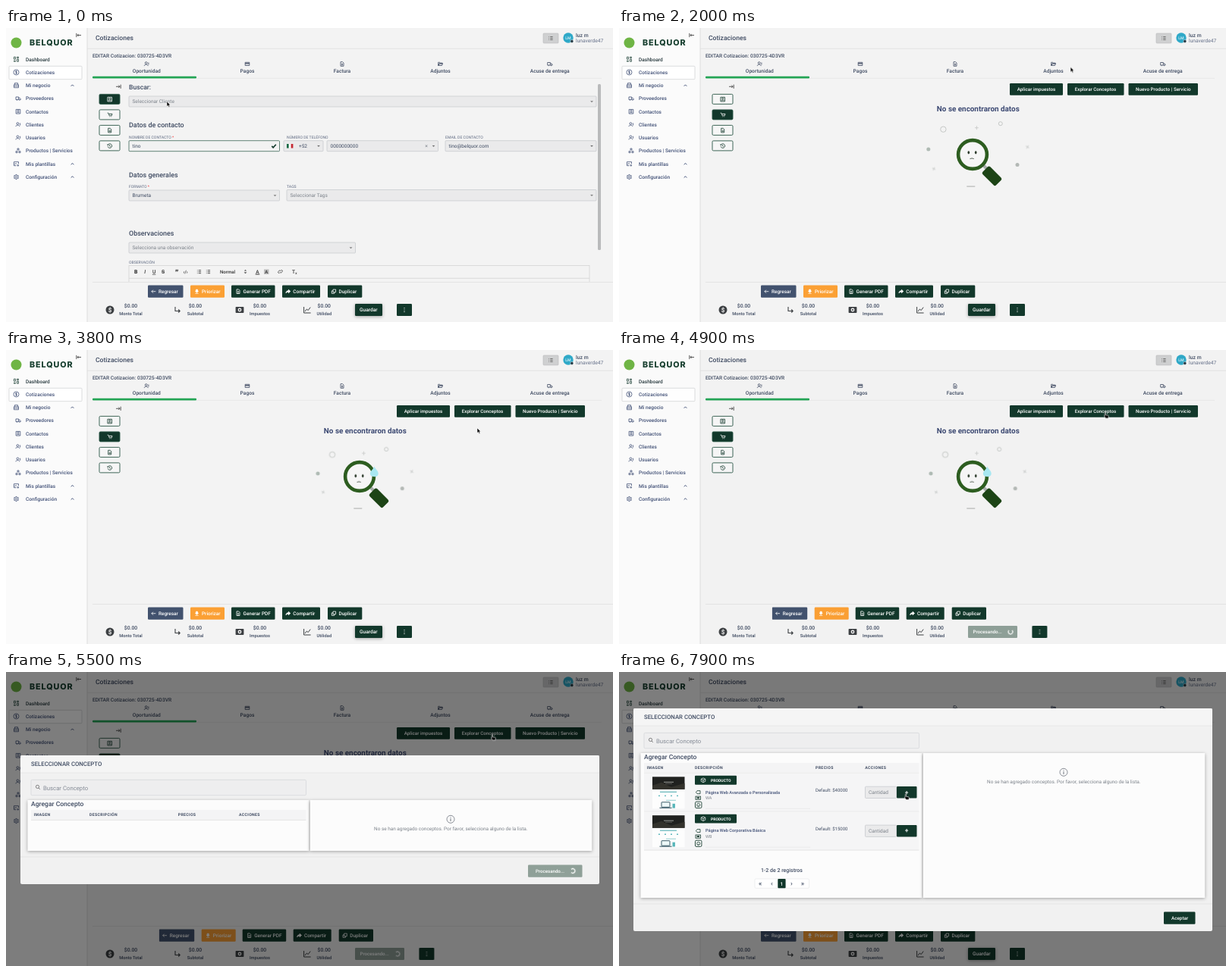
Write an HTML page that moves like this. It is 800 px wide and 388 px high and loops after 8 s.

```html
<!DOCTYPE html>
<html lang="es">
<head>
<meta charset="utf-8">
<title>Cotizaciones</title>
<style>
html, body { margin: 0; width: 100%; height: 100%; overflow: hidden; background: #f3f3f3; }
svg { display: block; }
text { font-family: Roboto, sans-serif; text-rendering: geometricPrecision; white-space: pre; }
.logo { font-family: Inter, sans-serif; letter-spacing: .9px; }
.caps { letter-spacing: .35px; }
.shade { filter: drop-shadow(0 1px 2px #0005); }
.form, .empty, .idle, .busy, .full, .thumbs, .arrow, .hand, .row, .menu { animation: 8s step-end infinite; }
.form { animation-name: form; }
.empty { animation-name: empty; }
.idle { animation-name: idle; }
.busy { animation-name: busy; }
.row { animation-name: row; }
.menu { animation-name: menu; }
.full { animation-name: full; }
.thumbs { animation-name: thumbs; }
.arrow { animation-name: arrow; }
.hand { animation-name: hand; }
.backdrop { animation: backdrop 8s linear infinite; }
.loading { animation: loading 8s linear infinite; }
.cursor { animation: cursor 8s ease-in-out infinite; }
.drift { animation: drift 8s ease-in-out infinite; }
.drop { animation: drop 8s ease-in-out infinite; }
.spin { animation: spin .8s linear infinite; }
@keyframes form { 0% { opacity: 1 } 13.75%, 100% { opacity: 0 } }
@keyframes empty { 0% { opacity: 0 } 13.75%, 100% { opacity: 1 } }
@keyframes idle { 0% { opacity: 1 } 60% { opacity: 0 } 72.5%, 100% { opacity: 1 } }
@keyframes busy { 0% { opacity: 0 } 60% { opacity: 1 } 72.5%, 100% { opacity: 0 } }
@keyframes row { 0% { transform: none } 60% { transform: translateX(14.7px) } 72.5%, 100% { transform: none } }
@keyframes menu { 0% { transform: none } 60% { transform: translateX(29.4px) } 72.5%, 100% { transform: none } }
@keyframes full { 0% { opacity: 0 } 72.5%, 100% { opacity: 1 } }
@keyframes thumbs { 0% { opacity: 0 } 81.25%, 100% { opacity: 1 } }
@keyframes arrow { 0% { opacity: 1 } 9% { opacity: 0 } 15.5% { opacity: 1 } 53.5% { opacity: 0 } 71% { opacity: 1 } 88% { opacity: 0 } 100% { opacity: 0 } }
@keyframes hand { 0% { opacity: 0 } 9% { opacity: 1 } 15.5% { opacity: 0 } 53.5% { opacity: 1 } 71% { opacity: 0 } 88%, 100% { opacity: 1 } }
@keyframes backdrop { 0%, 61.25% { opacity: 0 } 63.5%, 100% { opacity: .5 } }
@keyframes loading {
  0%, 65.6% { opacity: 0; transform: translateY(-20px) }
  68.5%, 72.49% { opacity: 1; transform: none }
  72.5%, 100% { opacity: 0; transform: none }
}
@keyframes cursor {
  0%, 2.5% { transform: translate(212px, 97px) }
  10%, 14.5% { transform: translate(137px, 113px) }
  25% { transform: translate(595px, 51.5px) }
  33% { transform: translate(632px, 78px) }
  45%, 48% { transform: translate(621px, 103px) }
  55%, 70% { transform: translate(640px, 82.5px) }
  77.5% { transform: translate(522px, 77.5px) }
  89%, 100% { transform: translate(377px, 161px) }
}
@keyframes drift { 0%, 25% { transform: none } 47%, 100% { transform: translate(var(--x), var(--y)) } }
@keyframes drop { 0%, 34% { opacity: 0; transform: translateY(-7px) } 46%, 100% { opacity: 1; transform: none } }
@keyframes spin { to { transform: rotate(360deg) } }
</style>
</head>
<body>
<svg id="stage" width="800" height="388" viewBox="0 0 800 388"></svg>
<script>
const NAVY = '#435278', SLATE = '#3f4b62', GREEN = '#12382b', GREY = '#7d838b', MUTED = '#8fa098';

const T = (x, y, s, size = 6.55, fill = NAVY, weight = 500, anchor = 'start', cls = '') =>
  `<text x="${x}" y="${y}" font-size="${size}" fill="${fill}" font-weight="${weight}" text-anchor="${anchor}" class="${cls}">${s}</text>`;
const M = (x, y, s, size, fill, weight) => T(x, y, s, size, fill, weight, 'middle');
const R = (x, y, w, h, fill, stroke = 'none', r = 0, extra = '') =>
  `<rect x="${x}" y="${y}" width="${w}" height="${h}" fill="${fill}" stroke="${stroke}" rx="${r}" ${extra}/>`;
const C = (x, y, r, fill, stroke = 'none', w = 1) =>
  `<circle cx="${x}" cy="${y}" r="${r}" fill="${fill}" stroke="${stroke}" stroke-width="${w}"/>`;
const L = (x1, y1, x2, y2, c = '#ddd', w = .7) =>
  `<path d="M${x1} ${y1}L${x2} ${y2}" stroke="${c}" stroke-width="${w}"/>`;
const G = (cls, ...parts) => `<g class="${cls}">${parts.join('')}</g>`;

// Icon paths, centred on the origin
const ICONS = {
  grid: 'M-3-3h2v3h-2zM1-3h2v1.5h-2zM-3 2h2v1h-2zM1 0h2v3h-2z',
  coin: 'M-3.5 0a3.5 3.5 0 1 0 7 0a3.5 3.5 0 1 0-7 0M1-1.3c-.8-.8-2-.5-2 .3c0 1.1 2 .8 2 1.9c0 .8-1.3 1-2 .3M0-2.3v4.6',
  bag: 'M-3-1h6v4h-6zM-2-1v-2h4v2M-3 1h6',
  truck: 'M-3-2h3.6v3.6h-3.6zM.6-.6h1.7l1 1.2v1h-2.7M-2 2.2h1M1.4 2.2h1',
  card: 'M-2.8-2.8h5.6v5.6h-5.6zM-1 -.8a1 1 0 1 0 2 0a1 1 0 1 0-2 0M-1.8 2c.4-1.4 3.2-1.4 3.6 0',
  user: 'M-2-1.4a1.4 1.4 0 1 0 2.8 0a1.4 1.4 0 1 0-2.8 0M-3 2.6c0-2.6 4.8-2.6 4.8 0M2.6-2v3',
  boxes: 'M-1-3h2v2h-2zM-3 .6h2v2h-2zM1 .6h2v2h-2z',
  image: 'M3 0v-2.6h-6v5h3M-2 1l1.4-1.8l1.2 1.2M1 2h2.6M2.3.8v2.6',
  gear: 'M-2.7 0a2.7 2.7 0 1 0 5.4 0a2.7 2.7 0 1 0-5.4 0M-1 0a1 1 0 1 0 2 0a1 1 0 1 0-2 0M0-3.6v.9M0 2.7v.9M-3.2-1.7l.8.4M2.4 1.3l.8.4M-3.2 1.7l.8-.4M2.4-1.3l.8-.4',
  pay: 'M-2.8-2.2h5.6v4.2h-5.6zM-2.8-.8h5.6M-2.8-.4h5.6',
  doc: 'M-2-2.8h2.6l1.4 1.4v4.2h-4zM-1 0h2M-1 1.4h2',
  folder: 'M-2.8 2v-4.2h2l.7.9h2.8v.8h-4zl1-2.5h4.8l-1 2.5z',
  cart: 'M-3-2.4h1.2l1.3 3.6h3l.8-2.4h-4.2M-.2 2.5h.4M2 2.5h.4',
  clock: 'M-2.3-1.5a2.8 2.8 0 1 1-.3 2.2M-2.8-2.3v1.4h1.4M0-1.5v1.6l1.2.8',
  chevron: 'M-1.8 1l1.8-1.8l1.8 1.8',
  caret: 'M-1.6-.6h3.2l-1.6 1.6z',
  back: 'M2.8 0h-5.4M-.6-2l-2 2l2 2',
  down: 'M-1-2.5h2v2h1l-2 2l-2-2h1zM-2 2.6h4',
  share: 'M-2.8 2c.2-2.4 1.6-3 3.4-3v-1.4l2.4 2.2l-2.4 2.2v-1.4c-1.4 0-2.6.3-3.4 1.4z',
  copy: 'M-1-2.6h3.6v3.6h-3.6zM-1-.8h-1.7v3.4h3.5v-1.6',
  corner: 'M-3-3.5v5.5h6M1.2 0l2 2l-2 2',
  chart: 'M-4.4-4v8h9M-3 2l2.4-3l1.8 1.6l3-4',
  list: 'M-2.6-2h.6M-.8-2h3.4M-2.6 0h.6M-.8 0h3.4M-2.6 2h.6M-.8 2h3.4',
  link: 'M-.4 1l-.8.8a1.2 1.2 0 0 1-1.6-1.6l1.4-1.4a1.2 1.2 0 0 1 1.6 0M.4-1l.8-.8a1.2 1.2 0 0 1 1.6 1.6l-1.4 1.4a1.2 1.2 0 0 1-1.6 0',
  search: 'M-2.6-.6a2.1 2.1 0 1 0 4.2 0a2.1 2.1 0 1 0-4.2 0M1 1l1.9 1.9',
  tag: 'M-2.6 0l1.6-2h4v4h-4z',
  box: 'M-2.8-1.4l2.8-1.4l2.8 1.4v3l-2.8 1.4l-2.8-1.4zl2.8 1.4l2.8-1.4M0 0v3',
  check: 'M-2.7.1l1.9 1.9l3.6-4',
  bar: 'M-3 0h5M.3-1.7l1.7 1.7l-1.7 1.7M3.2-2.6v5.2',
};
const I = (x, y, name, c = NAVY, fill = 'none', w = .8) =>
  `<path transform="translate(${x} ${y})" d="${ICONS[name]}" stroke="${c}" fill="${fill}" stroke-width="${w}" stroke-linejoin="round"/>`;

const button = (x, y, w, h, label, tx, size = 6.4, fill = GREEN) =>
  R(x, y, w, h, fill, 'none', 1.2) + T(tx, y + h / 2 + 2.3, label, size, '#fff');
const field = (x, y, w, h, label = '', fill = '#eaeaeb', stroke = '#c3c6ca', color = GREY) =>
  R(x, y, w, h, fill, stroke, 1, 'stroke-width=".7"') + T(x + 4.5, y + h / 2 + 2.3, label, 6.5, color, 400);
const select = (x, y, w, h, label, color) =>
  field(x, y, w, h, label, '#eaeaeb', '#c3c6ca', color) + I(x + w - 6, y + h / 2, 'caret', '#666', '#666', .2);
const spinner = (x, y) =>
  `<g transform="translate(${x} ${y})"><path class="spin" d="M0-2.9a2.9 2.9 0 1 1-2.9 2.9" fill="none" stroke="#fff" stroke-width="1.1"/></g>`;

function sidebar() {
  const items = [['Dashboard', 'grid'], ['Cotizaciones', 'coin'], ['Mi negocio', 'bag', 1], ['Proveedores', 'truck'],
    ['Contactos', 'card'], ['Clientes', 'user'], ['Usuarios', 'user'], ['Productos | Servicios', 'boxes'],
    ['Mis plantillas', 'image', 1], ['Configuración', 'gear', 1]];
  const rows = items.map(([label, icon, open], i) => {
    const y = 41.2 + i * 17.26, child = i > 2 && i < 8;
    return I(child ? 16 : 13.5, y, icon, i ? NAVY : '#24463b') + T(26, y + 2.3, label, 6.55, i ? NAVY : '#24363b')
      + (open ? I(87.5, y, 'chevron', NAVY, 'none', 1) : '');
  });
  return R(0, 0, 107, 388, '#fbfbfb') + L(107, 0, 107, 388, '#d5d5d5')
    + C(13.5, 19.5, 7, '#6fb545') + T(31, 23.4, 'BELQUOR', 10.8, '#173f2f', 800, 'start', 'logo')
    + `<g transform="translate(96 9.5) scale(-1 1)">${I(0, 0, 'bar', '#333')}</g>`
    + R(4, 50.3, 96, 17.4, '#fff', '#d3d5d6', 1, 'stroke-width=".8"') + rows.join('');
}

function header() {
  const tabs = [['Oportunidad', 185.3, 'user'], ['Pagos', 318, 'pay'], ['Factura', 443, 'doc'],
    ['Adjuntos', 572.5, 'folder'], ['Acuse de entrega', 716.7, 'truck']];
  return L(107, 27.3, 800, 27.3) + T(118, 16.2, 'Cotizaciones', 8.6, SLATE)
    + R(708, 7, 20, 13, '#cfd0d1', '#b9bbbd', 1, 'stroke-width=".6"') + I(718, 13.5, 'list', '#555')
    + C(741, 13, 6.7, '#2fa9c8') + M(741, 15, 'LM', 5.2, '#dff5fa') + C(745.8, 17.5, 2, '#1d3440', '#f3f3f3', .5)
    + T(751, 11.5, 'luz m', 6.8, SLATE) + T(751, 19.3, 'lunaverde47', 6.7, '#66718a', 400)
    + T(114, 39.2, 'EDITAR Cotizacion: 030725-4D3VR', 6.67, SLATE)
    + tabs.map(([s, x, icon]) => I(x, 47.5, icon, SLATE) + M(x, 58.9, s, 6.65, SLATE)).join('')
    + L(251, 66.3, 785, 66.3, '#e4e4e4') + R(114, 63.8, 137, 2.8, '#23a455', 'none', 1);
}

const sideTabs = active => ['card', 'cart', 'doc', 'clock'].map((icon, i) => {
  const y = 87.4 + i * 20.5, on = i === active;
  return R(123, y, 27, 13, on ? GREEN : '#f6f6f6', '#2a5646', 1.4, 'stroke-width=".9"') + I(136.7, y + 6.7, icon, on ? '#fff' : GREEN);
}).join('') + I(148, 77.3, 'bar', '#333');

function form() {
  const label = (x, y, s, req) => T(x, y, s + (req ? ' <tspan fill="#e33">*</tspan>' : ''), 5.1, '#5d6880', 400);
  const title = (y, s) => T(162, y, s, 8.95, SLATE);
  const tools = ['B', 'I', 'U', 'S'].map((s, i) => `<text x="${171.3 + i * 11.9}" y="323.9" font-size="6.8" font-weight="${i ? 500 : 800}" text-anchor="middle" fill="#333" ${['', 'font-style="italic"', 'text-decoration="underline"', 'text-decoration="line-through"'][i]}>${s}</text>`).join('');
  return R(108, 70, 692, 265, '#f3f3f3') + sideTabs(0)
    + T(162, 80.6, 'Buscar:', 8.6, SLATE) + select(162, 90, 616, 14, 'Seleccionar Cliente')
    + title(130.8, 'Datos de contacto')
    + label(162, 145.5, 'NOMBRE DE CONTACTO', 1) + field(162, 148.7, 198.5, 14, 'tino', '#f2f2f2', '#245343', SLATE) + I(353, 155.8, 'check', GREEN, 'none', 1.7)
    + label(370, 145.5, 'NÚMERO DE TELÉFONO') + select(366, 148.7, 52, 14, '')
    + R(370, 153, 2.8, 5.5, '#176b45') + R(372.8, 153, 2.8, 5.5, '#fff') + R(375.6, 153, 2.8, 5.5, '#c52b35') + T(386, 158, '+52', 6.5, SLATE, 400)
    + select(423, 148.7, 146.5, 14, '0000000000', SLATE) + M(554, 158, '×', 7, GREY, 400)
    + label(579, 145.5, 'EMAIL DE CONTACTO') + select(579, 148.7, 199, 14, 'tino@belquor.com', SLATE)
    + title(196.6, 'Datos generales')
    + label(162, 210.8, 'FORMATO', 1) + select(162, 214, 198.5, 14, 'Brumeta', SLATE)
    + label(370, 210.8, 'TAGS') + select(370, 213.5, 408, 14.5, 'Seleccionar Tags')
    + title(274, 'Observaciones') + select(162, 283, 298.5, 14, 'Selecciona una observación')
    + label(162, 310.5, 'OBSERVACIÓN') + R(162, 313.5, 607, 22, 'none', '#d0d0d0', 0, 'stroke-width=".7"') + L(162, 330.3, 769, 330.3, '#d0d0d0')
    + tools + M(225, 326.5, '”', 11, '#333', 800) + M(236.5, 323.6, '‹/›', 6, '#333', 700)
    + I(254.5, 321.7, 'list', '#333') + I(266.5, 321.7, 'list', '#333') + T(282, 323.9, 'Normal', 6.1, '#333')
    + I(315.5, 323, 'caret', '#333', '#333', .2) + `<path d="M313.9 320.6h3.2l-1.6-1.6z" fill="#333"/>`
    + M(331.5, 323.7, 'A', 6.5, '#333') + L(328.7, 325, 334.3, 325, '#333', 1) + R(340, 318.5, 6.5, 6.5, '#bbb') + M(343.2, 324, 'A', 6, '#333')
    + I(361.5, 321.5, 'link', '#333') + M(379, 324, 'T', 6.6, '#333') + M(382.3, 325, 'x', 4.5, '#333')
    + R(780, 74, 4, 219, '#b9babb', 'none', 1.5);
}

function emptyView() {
  const drift = (x, y, shape) => `<g class="drift" style="--x:${x}px;--y:${y}px">${shape}</g>`;
  const cross = (x, y, r, turn) => `<path transform="translate(${x} ${y}) rotate(${turn})" d="M${-r} 0h${2 * r}M0 ${-r}v${2 * r}" stroke="#c9cbca" stroke-width=".9"/>`;
  return sideTabs(1)
    + button(515, 73, 70, 15.8, 'Aplicar impuestos', 524.8, 6.25) + button(591, 73, 74.5, 15.8, 'Explorar Conceptos', 600.8, 6.23)
    + button(671.5, 73, 91.5, 15.8, 'Nuevo Producto | Servicio', 681, 6.3)
    + M(473.3, 109.9, 'No se encontraron datos', 9.9, '#3d4a73', 700)
    + drift(2.6, 4.4, C(427.4, 133.7, 3.7, 'none', '#c4c7c5')) + drift(-1.6, 4.8, C(502.8, 126.2, 2.5, 'none', '#c4c7c5'))
    + drift(3.2, 3, C(407.8, 160, 2.5, '#afbbb4')) + drift(-2.8, 2.2, C(525, 180.4, 2.5, '#b3b8b5'))
    + drift(0, 4.6, cross(471.4, 131.7, 2.4, 0)) + drift(-3.6, 3.4, cross(538.4, 157, 2.5, 35)) + drift(3, 1.8, cross(415, 185.8, 2.3, 30))
    + R(458, 208.2, 11.5, 1.7, '#c9cac9', 'none', .8)
    + L(478, 179, 486, 187, '#a8adab', 4)
    + `<g transform="translate(491.5 195.3) rotate(45)">${R(-12.5, -7, 25, 14, '#1d4416', 'none', 2.5)}</g>`
    + C(466, 167, 18.9, '#f6f6f6', '#2d5d20', 4.6)
    + drift(0, 1.8, `<g fill="#2b3a2a"><ellipse cx="460.8" cy="164.3" rx="1.3" ry="2.1"/><ellipse cx="470.2" cy="164.3" rx="1.3" ry="2.1"/></g><path d="M462.5 172.6q2.6-1.3 5.2 0" fill="none" stroke="#2b3a2a" stroke-width=".8"/>`)
    + G('drop', '<path d="M485.3 153.8c1.7 3.5 5.4 5.8 5.4 9.2c0 3-2.6 4.4-5.6 4.3c-3.2 0-5.6-2-5.2-4.7c.4-3 4-5 5.4-8.8z" fill="#a9e8f2"/>');
}

function footer() {
  const sums = [['Monto Total', 164.5], ['Subtotal', 249.5], ['Impuestos', 334.5], ['Utilidad', 419.3]];
  const act = (x, w, s, icon, tx, fill) => button(x, 339.5, w, 16.3, s, tx, 6.45, fill) + I(tx - 6.5, 347.7, icon, '#fff', icon === 'down' || icon === 'share' ? '#fff' : 'none');
  return R(108, 335, 692, 53, '#f3f3f3') + L(114, 335.5, 800, 335.5, '#dedede')
    + G('row', act(187, 46.5, 'Regresar', 'back', 201, '#42526e'), act(243, 45, 'Priorizar', 'down', 258, '#fba034'),
      act(297, 57.5, 'Generar PDF', 'doc', 312.5), act(364, 50, 'Compartir', 'share', 378.3), act(424, 45.3, 'Duplicar', 'copy', 438.5))
    + C(137, 372, 5.5, '#3d4043') + M(137, 375, '$', 8, '#f3f3f3', 700) + I(226, 371.5, 'corner', '#3d4043', 'none', 1.1)
    + R(302.6, 368, 10.8, 8, '#3d4043', 'none', .8) + C(308, 372, 2.4, '#f3f3f3') + C(308, 372, 1.1, '#3d4043') + I(397, 372, 'chart', '#3d4043', 'none', 1)
    + sums.map(([s, x]) => M(x, 368.5, '$0.00', 6.8, SLATE) + M(x, 378.9, s, 5.75, SLATE)).join('')
    + G('idle', G('shade', button(460, 364, 36, 16, 'Guardar', 466, 6.6)))
    + G('busy', button(460, 364, 65, 16, 'Procesando...', 466.5, 6.2, MUTED), spinner(516, 372))
    + G('menu', R(515, 364, 20, 16, GREEN, 'none', 1.2), [-2.4, 0, 2.4].map(d => C(525, 372 + d, .6, '#fff')).join(''));
}

function modal(y, panel, cols, body, action) {
  const top = y + 59, end = top + panel + 44;
  const heads = ['IMAGEN', 'DESCRIPCIÓN', 'PRECIOS', 'ACCIONES'];
  return R(19, y, 763, end - y, '#f1f1f1', 'none', 2) + R(19, y, 763, 23, '#f5f5f5', 'none', 2) + L(19, y + 23, 782, y + 23, '#e2e2e2')
    + T(33, y + 14.4, 'SELECCIONAR CONCEPTO', 7.78, SLATE)
    + R(33, y + 32.3, 362.5, 20.5, '#eeeeef', '#d3d5d8', 1.5, 'stroke-width=".7"') + I(42, y + 42, 'search', '#666') + T(49, y + 45.5, 'Buscar Concepto', 7.75, '#858b96', 400)
    + G('shade', R(28.5, top, 371, panel, '#fcfcfc')) + G('shade', R(400.7, top, 371.5, panel, '#fcfcfc'))
    + T(33, y + 67, 'Agregar Concepto', 8.55, SLATE) + R(33, y + 72, 362.5, 13.3, '#f4f4f5') + L(33, y + 85.4, 395.5, y + 85.4)
    + heads.map((s, i) => T(cols[i], y + 80.4, s, 5.2, SLATE, 700, 'start', 'caps')).join('')
    + C(586, y + 84.3, 5, 'none', '#6c727c', .8) + L(586, y + 83.3, 586, y + 87, '#6c727c', 1) + C(586, y + 81.8, .6, '#6c727c')
    + M(586.3, y + 98.5, 'No se han agregado conceptos. Por favor, selecciona alguno de la lista.', 6.41, GREY, 400)
    + body + L(19, top + panel + 8, 782, top + panel + 8, '#e0e0e0') + action(end - 25.5);
}

const product = (y, name, code, price) =>
  R(33, y, 362.5, 50.7, '#f5f5f6') + L(33, y + 50.7, 395.5, y + 50.7, '#dcdcdc')
  + R(100, y + 3.3, 55, 11.9, GREEN, 'none', 1) + I(111, y + 9.2, 'box', '#fff', 'none', .7) + T(121, y + 11.1, 'PRODUCTO', 5.1, '#fff', 700)
  + I(104, y + 25.2, 'tag', GREEN) + T(114, y + 27, name, 5.65, NAVY)
  + R(101, y + 30.6, 6.5, 4.2, 'none', GREEN, 0, 'stroke-width=".8"') + L(102.6, y + 32.7, 106, y + 32.7, GREEN, 1.8) + T(114, y + 34.9, code, 5.5, GREY, 400)
  + R(100.5, y + 37.8, 8.4, 8.2, '#fff', GREEN, 1.4, 'stroke-width=".9"') + C(104.7, y + 42, 2.1, 'none', GREEN, .8) + L(104.7, y + 42, 104.7, y + 44, GREEN)
  + L(114, y + 46.8, 252, y + 46.8, '#e6e6e6')
  + T(259, y + 24.3, `Default: ${price}`, 6, SLATE, 400)
  + field(324.5, y + 17.7, 41, 15.3, 'Cantidad') + R(366, y + 17.5, 26.5, 15.6, GREEN, 'none', 1) + M(379.2, y + 28, '+', 8.5, '#fff');

const thumb = y =>
  R(44, y, 42.5, 42, '#fdfdfd') + R(44, y, 42.5, 16.5, '#20211f') + `<path d="M44 ${y + 16.5}v-5l12-4l13 6l17.5-5v8z" fill="#33322c"/>`
  + L(59, y + 7, 72, y + 7, '#b9bab5', .8) + L(61, y + 9, 70, y + 9, '#83847f', .6) + L(54, y + 20, 76, y + 20, '#46a9ae', 1)
  + [53, 61, 69, 77].map(x => C(x, y + 25, .9, '#3faab0')).join('')
  + L(62, y + 31, 75, y + 31, '#7cc2c4', .8)
  + R(56, y + 33.5, 11, 6.5, '#eef8f8', '#274b59', .5, 'stroke-width=".9"') + L(53.5, y + 41, 69.5, y + 41, '#274b59', 1) + R(70.5, y + 35.5, 3.4, 5.8, '#56b5b8');

const pages = T(187, 264.2, '1-2 de 2 registros', 7, SLATE) + R(179, 273, 71.5, 12.3, '#fff', '#e2e4e6', 1.5, 'stroke-width=".6"')
  + R(209.3, 273, 10.3, 12.3, GREEN, 'none', 1)
  + ['«', '‹', '1', '›', '»'].map((s, i) => M([186.3, 201.5, 214.4, 227.3, 242][i], 281.7, s, i === 2 ? 6.5 : 9, i === 2 ? '#fff' : SLATE, 500)).join('');

const rows = product(133.5, 'Página Web Avanzada o Personalizada', 'WA', '$40000') + product(184.4, 'Página Web Corporativa Básica', 'WB', '$15000')
  + pages + G('thumbs', thumb(138.3), thumb(189.2));

const pointer = G('cursor',
  G('arrow', '<path d="M0 0v6.6l1.6-1.4l1.1 2.4l1.2-.5l-1.1-2.4h2z" fill="#000" stroke="#fff" stroke-width=".6"/>'),
  G('hand', '<path d="M.2.8c0-1 1.3-1 1.3 0v2.5l3 .5q.9.2.8 1.2l-.5 2.6h-3.2l-2-2.6c-.5-.7.2-1.2.6-.7z" fill="#000" stroke="#fff" stroke-width=".6"/>'));

document.getElementById('stage').innerHTML = R(0, 0, 800, 388, '#f3f3f3') + sidebar() + header()
  + G('form', form()) + G('empty', emptyView()) + footer()
  + G('backdrop', R(0, 0, 800, 388, '#000'))
  + G('loading', modal(110, 67, [36.7, 110, 226.7, 307], '', y => button(688, y, 71.5, 16.2, 'Procesando...', 698, 6.15, MUTED) + spinner(747, y + 8)))
  + G('full', modal(48, 191, [36.7, 100, 259, 324.3], rows, y => button(718, y, 41.5, 16.2, 'Aceptar', 728, 6.3)))
  + pointer;
</script>
</body>
</html>
```
